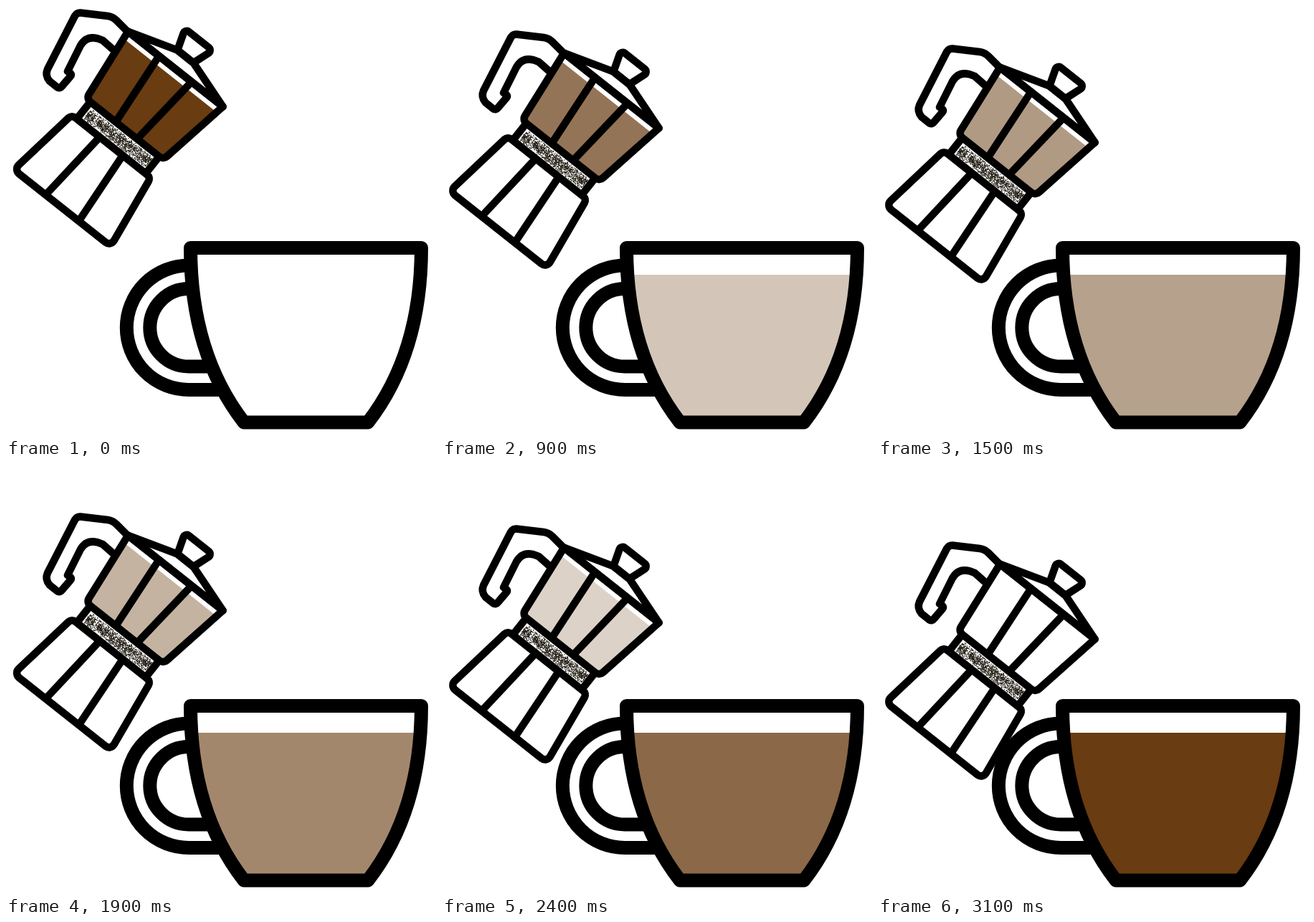
These frames come from a looping animation (600 by 600 pixels, 4.1 s). An HTML page with a canvas:

```html
<!DOCTYPE html>
<html lang="en">
<head>
<meta charset="utf-8">
<title>Moka pot and cup</title>
<style>
  html, body { margin: 0; width: 100%; height: 100%; overflow: hidden; background: #fff; }
  canvas { display: block; width: 600px; height: 600px; }
</style>
</head>
<body>
<canvas id="stage" width="600" height="600"></canvas>
<script>
const ctx = document.getElementById('stage').getContext('2d');
const LOOP = 4100, STEP = 100, LAST = 31, DROP = 104;
const COFFEE = '105, 60, 17';
const TILT = 38.4 * Math.PI / 180;

// The pot is a stack of rings around its own axis, seen from the side.
const ring = (y, half, radius = 0, mid = 0) =>
  ({ y, radius, left: mid - half, right: mid + half });
const SPOUT = 3.4;
const knob = ring(-52.5, 24.5, 5, SPOUT);
const lid = ring(-22.4, 14.2, 0, SPOUT);
const rim = ring(0, 84.4, 0, SPOUT);
const waist = ring(109.7, 68.5, 8);
const shoulder = ring(140, 70.3, 7);
const foot = ring(250, 86.2, 8);
const COLLAR = 61.3;

function section(top, bottom) {
  const path = new Path2D();
  const y = (top.y + bottom.y) / 2;
  const corner = (x1, y1, x2, y2, r) => path.arcTo(x1, y1, x2, y2, r);
  path.moveTo((top.left + bottom.left) / 2, y);
  corner(top.left, top.y, top.right, top.y, top.radius);
  corner(top.right, top.y, bottom.right, bottom.y, top.radius);
  corner(bottom.right, bottom.y, bottom.left, bottom.y, bottom.radius);
  corner(bottom.left, bottom.y, top.left, top.y, bottom.radius);
  path.closePath();
  return path;
}

function segment(x1, y1, x2, y2) {
  const path = new Path2D();
  path.moveTo(x1, y1);
  path.lineTo(x2, y2);
  return path;
}

const body = section(rim, waist);
const potLines = [
  section(knob, lid), section(lid, rim), body, section(shoulder, foot),
  segment(-26, rim.y, -16, waist.y),
  segment(32, rim.y, 22, waist.y)
];
for (const side of [-1, 1]) {
  potLines.push(
    segment(side * COLLAR, waist.y, side * COLLAR, shoulder.y),
    segment(side * 20.5, shoulder.y, side * 29.5, foot.y));
}

const potHandle = new Path2D(
  'M168 34L154 20Q149 15 142 14L104 9.5Q99 9 96 14L58 88Q54 97 61 105' +
  'L71 113Q75 116 78 112L90 98Q92 96 90 94L86 91L104 55Q114 38 135 48L152 63');

const cup = new Path2D(
  'M257.5 337.5H579.5C579.5 434 554.5 517 505 581H332C282.5 517 257.5 434 257.5 337.5Z');

function seeded(seed) {
  return () => (seed = (seed * 16807) % 2147483647) / 2147483647;
}

const grounds = new Path2D();
const random = seeded(4217);
for (let i = 0; i < 1250; i++) {
  const across = i % 2 ? random() : (random() + random()) / 2;
  grounds.rect(-55 + 110 * random(), 115.5 + 18 * across, 1.2, 1.2);
}

function drawCupHandle(radius, end) {
  ctx.beginPath();
  ctx.arc(255, 448.8, radius, -Math.PI / 2, Math.PI / 2, true);
  ctx.lineTo(end, 448.8 + radius);
  ctx.stroke();
}

function pour(shape, top, alpha) {
  ctx.save();
  ctx.clip(shape);
  ctx.fillStyle = `rgba(${COFFEE}, ${alpha})`;
  ctx.fillRect(-100, top, 700, 600);
  ctx.restore();
}

function drawCup(fill) {
  ctx.lineWidth = 19;
  drawCupHandle(86.7, 304);
  drawCupHandle(54.2, 284);
  ctx.fillStyle = '#fff';
  ctx.fill(cup);
  pour(cup, 375, fill);
  ctx.stroke(cup);
}

function drawPot(drop, fill) {
  ctx.save();
  ctx.translate(0, drop);
  ctx.lineWidth = 10.5;
  ctx.stroke(potHandle);
  ctx.translate(233.8, 85.9);
  ctx.rotate(TILT);
  pour(body, 11.5, fill);
  ctx.fillStyle = '#211c12';
  ctx.fill(grounds);
  potLines.forEach(line => ctx.stroke(line));
  ctx.restore();
}

function draw(time) {
  const progress = Math.min(LAST, Math.floor((time % LOOP) / STEP)) / LAST;
  ctx.fillStyle = '#fff';
  ctx.fillRect(0, 0, 600, 600);
  ctx.strokeStyle = '#000';
  ctx.lineJoin = 'round';
  drawCup(progress);
  drawPot(Math.round(DROP * progress), 1 - progress);
}

let start;
function tick(now) {
  start ??= now;
  draw(now - start);
  requestAnimationFrame(tick);
}
draw(0);
requestAnimationFrame(tick);
</script>
</body>
</html>
```
